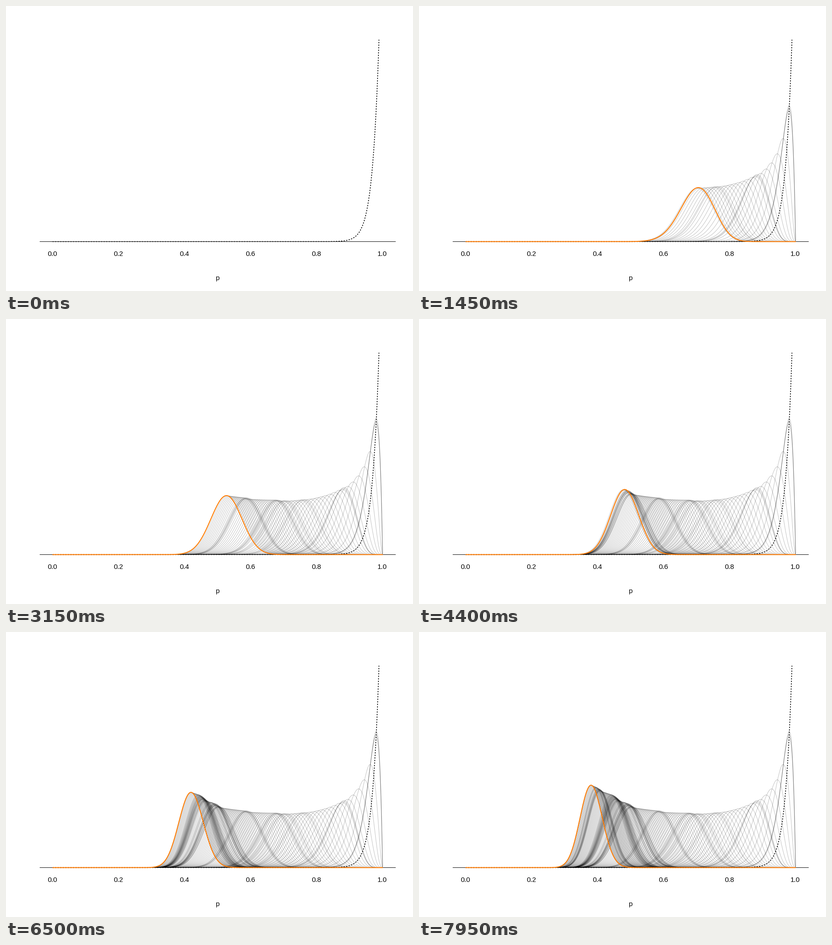
A matplotlib script for the animation above (8000 ms loop, 894 by 626 pixels).

```python
import math

import matplotlib.pyplot as plt
import numpy as np
from matplotlib.animation import FuncAnimation
from matplotlib.collections import LineCollection

W, H, DPI = 894, 626, 72          # at 72 dpi one point is one pixel
FRAMES, STEP_MS = 160, 50
LINE = 18                         # height of one margin line
TOP_DENSITY = 28
ORANGE = "#ff7a00"

# Trials that succeed; every other trial fails
SUCCESSES = {2, 3, 10, 11, 22, 29, 33, 35, 50, 51, 70, 72, 76, 78, 81, 83, 88,
             95, 98, 102, 104, 107, 110, 113, 116, 120, 137, 140, 144, 150}

p = np.linspace(0, 1, 401)


def beta_curve(a, b):
    log_c = math.lgamma(a + b) - math.lgamma(a) - math.lgamma(b)
    return math.exp(log_c) * p ** (a - 1) * (1 - p) ** (b - 1)


def posteriors():
    a, b = 50, 1
    curves = [beta_curve(a, b)]
    for trial in range(1, FRAMES):
        if trial in SUCCESSES:
            a += 1
        else:
            b += 1
        curves.append(beta_curve(a, b))
    return curves


curves = posteriors()
paths = [np.column_stack([p, c]) for c in curves]

plt.rcParams["font.family"] = "Liberation Sans"
fig = plt.figure(figsize=(W / DPI, H / DPI), dpi=DPI, facecolor="white")

left, right = 4.1 * LINE, W - 2.1 * LINE
bottom, top = 5.1 * LINE - 0.35, H - 4.1 * LINE - 0.35
ax = fig.add_axes([left / W, bottom / H, (right - left) / W, (top - bottom) / H])
ax.set_xlim(-0.04, 1.04)
ax.set_ylim(-0.04 * TOP_DENSITY, 1.04 * TOP_DENSITY)
ax.axis("off")

ax.plot([-0.04, 1.04], [0, 0], color="black", lw=0.95, zorder=1)
ax.plot(p, curves[0], color="black", lw=1.7, linestyle=(0, (0.8, 2.5)),
        dash_capstyle="round", zorder=2)
trail = LineCollection([], colors=[(0, 0, 0, 0.25)], linewidths=0.94, zorder=3)
ax.add_collection(trail, autolim=False)
current, = ax.plot([], [], color=ORANGE, lw=2, solid_capstyle="round",
                   solid_joinstyle="round", zorder=4)


def label(x, y, text):
    fig.text(x / W, 1 - y / H, text, fontsize=15, color="black",
             ha="center", va="baseline")


unit = (right - left) / 1.08
for k in range(6):
    label(left + unit * (0.04 + k / 5) - 0.6, 549, f"{k / 5:.1f}")
label((left + right) / 2 - 0.6, 602, "p")


def draw(n):
    trail.set_segments(paths[1:n])
    if n:
        current.set_data(p, curves[n])
    else:
        current.set_data([], [])
    return trail, current


anim = FuncAnimation(fig, draw, frames=FRAMES, interval=STEP_MS,
                     init_func=lambda: draw(0), repeat=True, repeat_delay=0)
plt.show()
```
